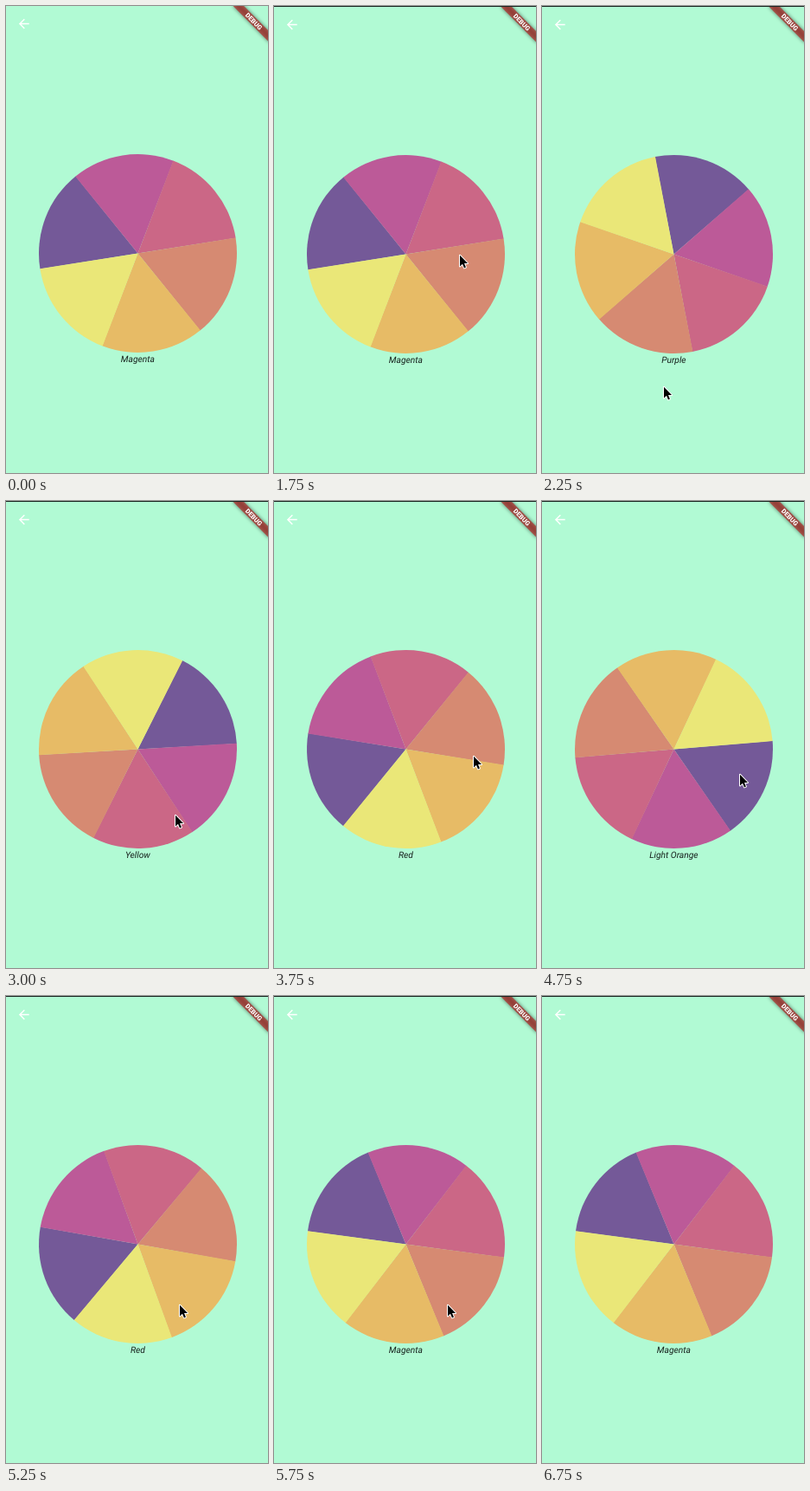
Recreate the animation shown at these times as an HTML page. Size 303 by 539 pixels, loop 7500 ms.

```html
<!DOCTYPE html>
<html lang="en">
<head>
<meta charset="utf-8">
<title>Colour wheel</title>
<style>
  html, body { margin: 0; width: 100%; height: 100%; overflow: hidden; background: #b1fad4; }
  svg { display: block; width: 100%; height: 100%; }
  text { font-family: Roboto, sans-serif; text-anchor: middle; text-rendering: geometricPrecision; }
</style>
</head>
<body>
<svg viewBox="0 0 303 539">
  <defs>
    <filter id="blur" x="-20%" y="-100%" width="140%" height="300%"><feGaussianBlur stdDeviation="3"/></filter>
  </defs>
  <rect width="303" height="539" fill="#b1fad4"/>
  <g id="screen">
    <path transform="translate(20.8 20.6) scale(.737) translate(-12 -12)" fill="#fff"
      d="M20 11H7.83l5.59-5.59L12 4l-8 8 8 8 1.41-1.41L7.83 13H20z"/>
    <g transform="translate(152.5 285.5)"><g id="wheel"></g></g>
    <text id="label" x="152.4" y="410.5" font-size="10.25" font-style="italic" fill="#16211c"></text>
    <g transform="translate(304.3 0) rotate(45) scale(.737)">
      <rect x="-40" y="28" width="80" height="12" fill-opacity=".5" filter="url(#blur)"/>
      <rect x="-40" y="28" width="80" height="12" fill="#b71c1c" fill-opacity=".63"/>
      <text y="37.6" font-size="10.2" font-weight="900" fill="#fff">DEBUG</text>
    </g>
  </g>
  <rect id="topLine" width="303" height="1" fill="#1c2622"/>
  <path id="cursor" d="M1 1.7V14.6L4 11.8 6 16.4 7.9 15.6 6 11.1H10Z"
    stroke="#fff" stroke-width="2" stroke-linejoin="round" paint-order="stroke"/>
</svg>
<script>
const STEP = 250, STEPS = 30, SHIFT_STEP = 4, RADIUS = 114.5;
const $ = id => document.getElementById(id);

// Clockwise from the wheel's zero edge.
const sectors = [
  ["Purple", "#745998"], ["Magenta", "#bc5a98"], ["Red", "#cb6786"],
  ["Orange", "#d68a72"], ["Light Orange", "#e7bb66"], ["Yellow", "#eae778"]
];

function rim(degrees) {
  const a = degrees * Math.PI / 180;
  return `${RADIUS * Math.cos(a)} ${RADIUS * Math.sin(a)}`;
}

// A slight overlap hides the seams between sectors.
$("wheel").innerHTML = sectors.map(([, fill], i) =>
  `<path fill="${fill}" d="M0 0L${rim(i * 60 - .1)}A${RADIUS} ${RADIUS} 0 0 1 ${rim(i * 60 + 60.1)}Z"/>`
).join("");

const easeOut = (p, power) => 1 - (1 - Math.min(Math.max(p, 0), 1)) ** power;

// Every fling slows to rest within four steps.
const REST_ANGLE = 171, FLING_STEPS = 4, FRICTION = 1.74;
const flings = [
  { start: 7, to: 296.7, power: FRICTION },
  { start: 13, to: -4.8, power: 1.17 },
  { start: 19, to: 187.6, power: FRICTION }
];
const angleAt = step => flings.reduce((angle, { start, to, power }) =>
  angle + (to - angle) * easeOut((step - start) / FLING_STEPS, power), REST_ANGLE);

// The pointer glides between two points, or rests, and is hidden otherwise.
const glides = [
  { start: 1, end: 1, from: [58, 519] },
  { start: 5, end: 7, from: [207, 366], to: [214, 286] },
  { start: 8, end: 9, from: [147, 443], to: [140, 438] },
  { start: 11, end: 12, from: [208, 309], to: [195, 361] },
  { start: 13, end: 13, from: [195, 340] },
  { start: 14, end: 15, from: [291, 82], to: [230, 293] },
  { start: 18, end: 19, from: [217, 316], to: [228, 314] },
  { start: 21, end: 25, from: [200, 355] },
  { start: 26, end: 26, from: [129, 461] }
];
function cursorAt(step) {
  const glide = glides.find(g => g.start <= step && step <= g.end);
  if (!glide) return null;
  const { start, end, from, to = from } = glide;
  const p = easeOut((step - start) / (end - start || 1), FRICTION);
  return from.map((v, i) => v + (to[i] - v) * p);
}

const show = (id, visible) => $(id).style.display = visible ? "" : "none";
const move = (id, x, y) => $(id).setAttribute("transform", `translate(${x} ${y})`);

function draw(step) {
  const angle = angleAt(step), shifted = step >= SHIFT_STEP, cursor = cursorAt(step);
  const top = Math.floor((630 - angle) % 360 / 60);
  $("wheel").setAttribute("transform", `rotate(${angle})`);
  $("label").textContent = sectors[top][0];
  move("screen", 0, shifted ? 1 : 0);
  show("topLine", shifted);
  show("cursor", cursor);
  if (cursor) move("cursor", ...cursor);
}

const begin = performance.now();
function tick() {
  draw(Math.floor((performance.now() - begin) / STEP) % STEPS);
  requestAnimationFrame(tick);
}
tick();
</script>
</body>
</html>
```
